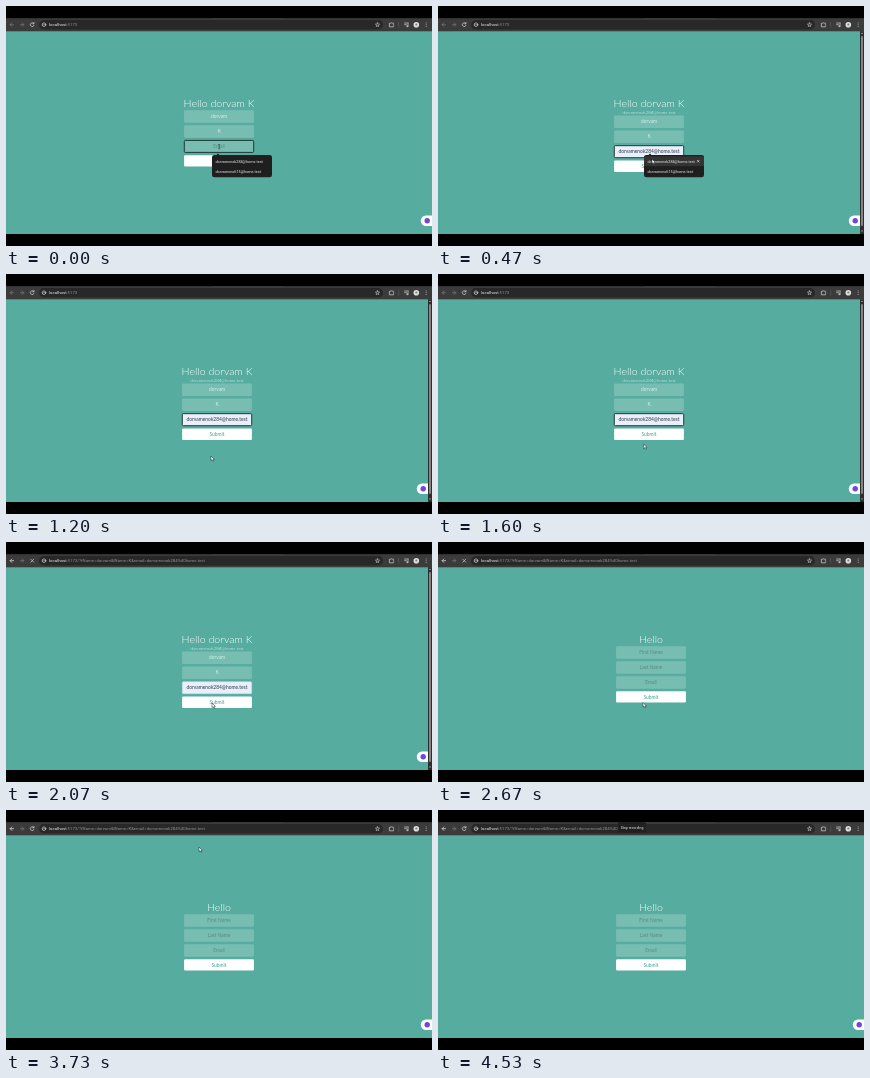
Animation of 426 by 240 pixels, one loop 4590 ms. Source, as an HTML page:

```html
<!DOCTYPE html>
<html lang="en">
<head>
<meta charset="utf-8">
<title>Form demo</title>
<style>
  html, body { margin: 0; width: 100%; height: 100%; overflow: hidden; background: #000; }
  svg { display: block; width: 100%; height: 100%; }
  text { font-family: Lato, sans-serif; font-size: 4.9px; }
  .mid { text-anchor: middle; }
  .ui { font-family: Roboto, sans-serif; font-size: 3.75px; fill: #eee; }
  .field { fill: #fff; fill-opacity: .2; stroke: #fff; stroke-opacity: .16; stroke-width: .5; }
  .icon { fill: none; stroke: #c9c9c9; stroke-width: .75; stroke-linecap: round; stroke-linejoin: round; }
  .light { font-weight: 300; fill: #fff; }
</style>
</head>
<body>
<svg viewBox="0 0 426 240" preserveAspectRatio="none">
  <rect width="426" height="240"/>

  <!-- browser toolbar -->
  <rect y="12" width="426" height="13.3" fill="#3b3b3b"/>
  <path d="M0 12.4H206M277 12.4H426" stroke="#2c2c2c" stroke-width=".8"/>
  <rect x="33" y="14" width="344" height="9.4" rx="4.7" fill="#282828"/>
  <g class="icon">
    <path id="back" d="M7.6 18.7H4.2M5.8 17L4.2 18.7L5.8 20.4"/>
    <path d="M14.4 18.7H17.8M16.2 17L17.8 18.7L16.2 20.4" stroke="#777"/>
    <path id="reload" d="M27.8 17.6A1.9 1.9 0 1 0 28 19.3M28 16.4V17.8H26.6"/>
    <path id="stop" d="M24.8 17.2L27.8 20.2M27.8 17.2L24.8 20.2"/>
    <circle cx="38" cy="18.7" r="1.8"/>
    <path d="M36.8 18.7H39.2" stroke-width=".5"/>
    <path d="M371.5 16.7L372.1 18.1L373.6 18.2L372.4 19.2L372.8 20.7L371.5 19.9L370.2 20.7L370.6 19.2L369.4 18.2L370.9 18.1Z" stroke-width=".6"/>
    <path d="M383.8 17.2H385.1A.7 .7 0 0 1 386.4 17.2H387.4V18.4A.7 .7 0 0 1 387.4 19.7V20.8H383.8Z"/>
    <path d="M398.6 17H402.4M398.6 18.7H400.4M402 20.2V17.8"/>
    <circle cx="401.2" cy="20.2" r=".6"/>
  </g>
  <path d="M392.7 16V21.5" stroke="#666" stroke-width=".5"/>
  <circle cx="410.3" cy="18.7" r="2.8" fill="#e2dfd9"/>
  <circle cx="410.3" cy="18.4" r="1" fill="#777"/>
  <path d="M420.2 16.9v.1M420.2 18.7v.1M420.2 20.5v.1" class="icon" stroke-width="1"/>
  <text class="ui" x="43" y="20.2" style="font-size:4.3px">localhost<tspan id="query" fill="#929292"></tspan></text>

  <!-- page -->
  <rect y="25.2" width="426" height="202.8" fill="#55ac9f"/>
  <g id="form">
    <text id="heading" class="light mid" y="101.3" style="font-size:10.6px"></text>
    <text id="echo" class="light mid" y="108.4" style="font-size:4.4px"></text>
    <g id="controls">
      <rect class="field" x="-34.7" y="104.4" width="69.4" height="12" rx="1"/>
      <rect class="field" x="-34.7" y="119.4" width="69.4" height="12" rx="1"/>
      <rect id="emailBox" x="-34.7" y="134.4" width="69.4" height="12" rx="1"/>
      <text id="first" class="mid" y="112.1"></text>
      <text id="last" class="mid" y="127.1"></text>
      <text id="email" class="mid" y="142.1"></text>
      <rect x="-34.9" y="149.2" width="69.8" height="11.4" rx="1" fill="#fff"/>
      <text class="mid" y="156.6" fill="#3f9f90">Submit</text>
    </g>
  </g>

  <g id="scrollbar">
    <rect x="422" y="25.2" width="4" height="202.8" fill="#2d2d2d"/>
    <rect x="423" y="30" width="2" height="190" rx="1" fill="#858585"/>
    <path d="M423 28L424 26.6L425 28ZM423 224.6L424 226L425 224.6Z" fill="#aaa"/>
  </g>
  <g id="widget">
    <path d="M426 209.5H420A5.2 5.2 0 0 0 420 220H426Z" fill="#fff"/>
    <circle cx="421.2" cy="214.7" r="2.7" fill="#7047d8"/>
  </g>

  <g id="suggestions">
    <path d="M210 149.5L212 147.5L214 149.5Z" fill="#1f1f1f"/>
    <rect x="206" y="149" width="60" height="22.3" rx="2.4" fill="#1f1f1f"/>
    <g id="hover">
      <rect x="206" y="150.3" width="60" height="9.8" fill="#343434"/>
      <path d="M259.3 154.3L261.1 156.1M261.1 154.3L259.3 156.1" class="icon" stroke-width=".5"/>
    </g>
    <text id="option1" class="ui" x="209.5" y="156.6"></text>
    <text id="option2" class="ui" x="209.5" y="166.6"></text>
  </g>

  <g id="tooltip">
    <rect x="180" y="12" width="28" height="10.6" rx="1.5" fill="#202020"/>
    <text class="ui mid" x="194" y="18.5" style="font-size:3.5px">Stop recording</text>
  </g>
  <path id="ibeam" d="M212.2 138.5H214.2M213.2 138.5V142.8M212.2 142.8H214.2" fill="none" stroke="#222" stroke-width=".5"/>
  <path id="pointer" d="M0 0V4.6L1.1 3.7L1.9 5.3L2.7 4.9L2 3.4H3.3Z" fill="#fff" stroke="#111" stroke-width=".45"/>
</svg>

<script>
const LOOP = 4590;
const HOVER = 200, PICK = 400, CLOSE = 540, SUBMIT = 1930, RELOADED = 2650, LOADED = 2900,
      WIDGET = 3330, TOOLTIP = 4000;
const FIRST = "dorvam", LAST = "K";
const EMAIL = "dorvamenok284@home.test", OTHER_EMAIL = "dorvameno615@home.test";
const QUERY = `/?fName=${FIRST}&lName=${LAST}&email=${EMAIL.replace("@", "%40")}`;

// pointer tip: time, x, y
const PATH = [
  [0, 213, 141], [150, 213, 145], [300, 215, 153], [470, 214, 153], [600, 214, 154],
  [1100, 205, 182], [1300, 205, 182], [1850, 206, 161], [2070, 206, 161],
  [2670, 205, 160.5], [2950, 205, 160], [3600, 193, 37], [3760, 193, 37], [3960, 193, 16]
];

const el = {};
document.querySelectorAll("[id]").forEach(node => el[node.id] = node);
const show = (node, visible) => node.setAttribute("visibility", visible ? "visible" : "hidden");
const move = (node, x, y) => node.setAttribute("transform", `translate(${x} ${y})`);
const setText = (node, text, fill) => {
  if (node.textContent !== text) node.textContent = text;
  if (fill) node.setAttribute("fill", fill);
};

function pointerAt(t) {
  const i = PATH.findIndex(p => p[0] > t);
  if (i < 0) return PATH[PATH.length - 1].slice(1);
  const [t0, x0, y0] = PATH[i - 1], [t1, x1, y1] = PATH[i];
  const u = (t - t0) / (t1 - t0), k = u * u * (3 - 2 * u);
  return [x0 + (x1 - x0) * k, y0 + (y1 - y0) * k];
}

function drawForm(t) {
  const filled = t < RELOADED;
  const picked = filled && t >= PICK;
  const autofilled = filled && t >= HOVER;
  const focused = t < SUBMIT;
  const hint = "#578b83", typed = "#d9eeea";

  move(el.form, picked ? 211 : 213, 0);
  move(el.controls, 0, picked ? 5.3 : 0);
  setText(el.heading, filled ? `Hello ${FIRST} ${LAST}` : "Hello");
  setText(el.echo, picked ? EMAIL : "");
  setText(el.first, filled ? FIRST : "First Name", filled ? typed : hint);
  setText(el.last, filled ? LAST : "Last Name", filled ? typed : hint);
  setText(el.email, autofilled ? EMAIL : "Email", autofilled ? "#30343a" : hint);

  el.emailBox.setAttribute("class", focused || autofilled ? "" : "field");
  el.emailBox.setAttribute("fill", autofilled ? "#e8f0fe" : "rgba(255,255,255,.2)");
  el.emailBox.setAttribute("stroke", focused ? "#1c2826" : "#c5dcdf");
  el.emailBox.setAttribute("stroke-width", focused ? .9 : .5);

  show(el.scrollbar, picked);
  show(el.widget, filled || t >= WIDGET);
  move(el.widget, picked ? -4 : 0, 0);
}

function draw(t) {
  drawForm(t);
  const loading = t >= SUBMIT && t < LOADED;
  el.back.style.stroke = t < SUBMIT ? "#777" : "#ddd";
  show(el.stop, loading);
  show(el.reload, !loading);
  setText(el.query, ":5173" + (t < SUBMIT ? "" : QUERY));

  const open = t < CLOSE;
  show(el.suggestions, open);
  show(el.hover, open && t >= HOVER);
  show(el.tooltip, t >= TOOLTIP);
  show(el.ibeam, t < 150);
  show(el.pointer, t >= 150 && t < TOOLTIP);
  move(el.pointer, ...pointerAt(t));
}

setText(el.option1, EMAIL);
setText(el.option2, OTHER_EMAIL);
const start = performance.now();
function frame() {
  draw((performance.now() - start) % LOOP);
  requestAnimationFrame(frame);
}
frame();
</script>
</body>
</html>
```
